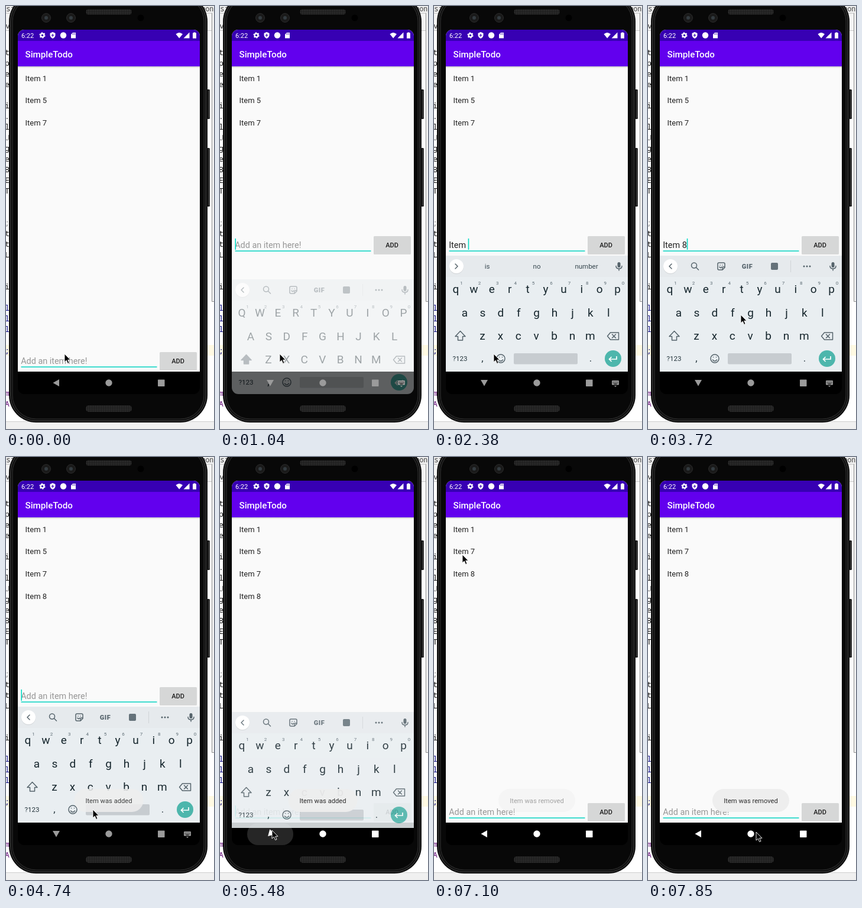
These frames come from a looping animation (352 px wide and 715 px high, 7.99 s). An HTML page:

```html
<!DOCTYPE html>
<html lang="en">
<head>
<meta charset="utf-8">
<title>Todo list demo</title>
<style>
  html, body { margin: 0; width: 100%; height: 100%; overflow: hidden; background: #fff; }
  svg { display: block; width: 352px; height: 715px; }
  text { font-family: Roboto, sans-serif; white-space: pre; }
  .code text { font: 13px "Noto Sans Mono", "DejaVu Sans Mono", monospace; }
  .mid { text-anchor: middle; }
  .line { fill: none; stroke: #55636b; stroke-width: 1.5; stroke-linecap: round; stroke-linejoin: round; }
</style>
</head>
<body>
<svg viewBox="0 0 352 715">
  <defs>
    <clipPath id="screen"><rect x="20" y="40" width="308" height="616" rx="11"/></clipPath>
    <pattern id="mesh" width="3" height="3" patternUnits="userSpaceOnUse">
      <rect width="3" height="3" fill="#191919"/><circle cx="1.5" cy="1.5" r=".9" fill="#3d3d3d"/>
    </pattern>
    <linearGradient id="shade" x2="0" y2="1">
      <stop stop-color="#000" stop-opacity=".2"/><stop offset="1" stop-color="#000" stop-opacity="0"/>
    </linearGradient>
  </defs>

  <!-- editor behind the phone -->
  <rect width="352" height="12" fill="#ececec"/>
  <rect y="12" width="352" height="30" fill="#f4f4f4"/>
  <path d="M0 12.5H352M0 41.5H352" stroke="#c9c9c9"/>
  <rect y="573" width="352" height="18" fill="#fffae3"/>
  <rect x="348" y="12" width="4" height="488" fill="#f1f1f1"/>
  <path d="M348.5 12V499.5H352" fill="none" stroke="#8e8e8e"/>
  <rect y="702" width="352" height="13" fill="#f0f0f0"/>
  <path d="M0 702.5H352" stroke="#cfcfcf"/>
  <g id="code" class="code"></g>
  <text x="331" y="9" font-size="12" fill="#444">hon</text>

  <!-- phone body -->
  <rect x="339" y="141" width="6" height="50" rx="1.5" fill="#1b1b1b"/>
  <rect x="339" y="240" width="6" height="99" rx="1.5" fill="#1b1b1b"/>
  <path d="M343.5 143V189M343.5 242V337" stroke="#4a4a4a"/>
  <rect x="5" y="-20" width="336" height="724" rx="46" fill="#0a0a0a"/>
  <rect x="7.5" y="-17.5" width="331" height="719" rx="43.5" fill="#111" stroke="#424242"/>
  <rect x="11" y="-14" width="324" height="712" rx="40" fill="#080808" stroke="#303030"/>
  <rect x="135.500" y="5.500" width="77" height="9" rx="4" fill="url(#mesh)"/>
  <rect x="135" y="675" width="78" height="11" rx="5" fill="url(#mesh)"/>
  <g fill="#1a1a1a" stroke="#2b2b2b">
    <circle cx="68" cy="20" r="7.500"/><circle cx="110" cy="20" r="7.500"/>
  </g>
  <circle cx="68" cy="20" r="3" fill="#333b40"/><circle cx="110" cy="20" r="3" fill="#333b40"/>
  <circle cx="228" cy="20" r="5.500" fill="#000"/>

  <g clip-path="url(#screen)">
    <rect x="20" y="40" width="308" height="578" fill="#fafafa"/>
    <rect x="20" y="102" width="308" height="3" fill="url(#shade)"/>
    <rect x="20" y="59" width="308" height="43" fill="#6200ee"/>
    <rect x="20" y="40" width="308" height="19" fill="#3700b3"/>
    <text x="32.500" y="87" font-size="15.200" font-weight="500" fill="#fff">SimpleTodo</text>

    <!-- status bar -->
    <g fill="#fff">
      <text x="26" y="53.500" font-size="11">6:22</text>
      <circle cx="61.500" cy="49.500" r="2.900" fill="none" stroke="#fff" stroke-width="2.200"/>
      <circle cx="61.500" cy="49.500" r="4.500" fill="none" stroke="#fff" stroke-width="1.300" stroke-dasharray="2.350"/>
      <path d="M79 44L83.500 46V49.500Q83 53 79 55Q75 53 74.500 49.500V46Z"/>
      <circle cx="97" cy="49.500" r="5.200"/>
      <path d="M113 45H118V54.500H110V48Z"/>
      <path d="M287.500 47.500Q293 42.500 299 47.500L293.200 54.500Z"/>
      <path d="M310.500 44.500V54.500H300.500Z"/>
      <path d="M317.500 44.500H320.500V45.500H322V54.800H316V45.500H317.500Z"/>
    </g>
    <path d="M79 47V52M76.800 49.500H81.200" stroke="#3700b3" stroke-width="1.200"/>
    <path d="M112.500 46.500V48.500M114.500 46V48.500M116.500 46V48.500" stroke="#3700b3" stroke-width=".8"/>

    <g id="list" font-size="13" fill="#212121"></g>

    <g id="field">
      <text id="entry" x="25.200" y="605" font-size="14.400"></text>
      <rect id="caret" y="589" width="1.600" height="19" fill="#03dac5"/>
      <rect x="25.500" y="609.300" width="230" height="1.700" fill="#1fd8c8"/>
      <rect x="260" y="586.500" width="63" height="29.500" rx="1.500" fill="#000" opacity=".13"/>
      <rect id="add" x="260" y="585" width="63" height="30" rx="1.500"/>
      <text class="mid" x="291" y="604" font-size="11" font-weight="500" fill="#1c1c1c">ADD</text>
    </g>

    <rect x="20" y="618" width="308" height="38" fill="#000"/>
    <rect id="ripple" x="46" y="619" width="78" height="37" rx="18" fill="#262626"/>

    <g id="keyboard">
      <rect x="20" y="422" width="308" height="196" fill="#e9eef1"/>
      <rect x="20" y="422" width="308" height="36" fill="#e6eaed"/>
      <circle cx="38" cy="441" r="12" fill="#000" opacity=".1"/>
      <circle cx="38" cy="440" r="12" fill="#fff"/>
      <path id="chevron" class="line" d="M40 436L36 440L40 444"/>
      <g id="tools">
        <circle class="line" cx="78" cy="438.500" r="4.500"/>
        <path class="line" d="M81.500 442L85.500 446" stroke-width="2"/>
        <path class="line" d="M120 434H128Q130 434 130 436V442L126 446H120Q118 446 118 444V436Q118 434 120 434M130 441H127Q126 441 126 446M121 441Q123 444 125 441M122 438H122.100M126 438H126.100"/>
        <text class="mid" x="168" y="444" font-size="11" font-weight="900" letter-spacing=".5" fill="#55636b">GIF</text>
        <rect x="208" y="434" width="12" height="12" rx="2" fill="#65727a"/>
        <path d="M241.500 430V450" stroke="#d0d5d8"/>
        <g fill="#55636b"><circle cx="264" cy="440" r="1.500"/><circle cx="269" cy="440" r="1.500"/><circle cx="274" cy="440" r="1.500"/></g>
      </g>
      <g id="hints" class="mid" font-size="11.500" fill="#37474f"></g>
      <rect x="310.500" y="433" width="5" height="9" rx="2.500" fill="#55636b"/>
      <path class="line" d="M308 439.500Q308 444 313 444Q318 444 318 439.500M313 444V447"/>
      <g id="keys" class="mid" fill="#15252c"></g>
      <path id="shift" class="line" d="M44.500 549.500L53 558.500H48.500V565H40.500V558.500H36Z"/>
      <path class="line" d="M298.500 552H312.500V564H298.500L293.500 558ZM301.500 555L307.500 561M307.500 555L301.500 561"/>
      <g class="mid" fill="#26363d">
        <text x="44" y="600" font-size="11.500">?123</text>
        <text x="82" y="601" font-size="17">,</text>
        <text x="265" y="601" font-size="17">.</text>
      </g>
      <circle class="line" cx="113" cy="596" r="7"/>
      <path class="line" d="M109.500 598Q113 602.500 116.500 598M110.500 593.500H110.600M115.500 593.500H115.600"/>
      <rect x="135" y="587" width="108" height="18.500" rx="2" fill="#c7ccd0"/>
      <circle cx="303" cy="596" r="14" fill="#4db6ac"/>
      <path d="M309 592V597H297M300.500 593L296.500 597L300.500 601" fill="none" stroke="#fff" stroke-width="1.700"/>
    </g>

    <g id="nav">
      <path id="back" d="M-5.500 0L5 -6V6Z"/>
      <circle cx="174" cy="637" r="5.700"/>
      <rect x="257" y="631.500" width="11.500" height="11.500" rx=".8"/>
      <g id="ime">
        <rect x="301" y="633" width="12" height="7.500" rx="1"/>
        <path d="M302.500 635.500H311.500M302.500 637.500H311.500" stroke="#000" stroke-dasharray="1 1"/>
        <path d="M304.500 639H309.500" stroke="#000"/><path d="M305 642H309L307 644Z"/>
      </g>
    </g>

    <g id="toast">
      <rect id="pill" y="561" height="39" rx="19.500" fill="#eeeeee"/>
      <text id="message" class="mid" x="174" y="585" font-size="11.200" fill="#202020"></text>
    </g>
  </g>

  <path id="mouse" d="M0 0V14L3.300 11L5.600 16.400L8 15.400L5.700 10.200H10Z" fill="#000" stroke="#fff" stroke-width=".9"/>
</svg>
<script>
const LOOP = 7990;
const LIFT = -196;
const $ = id => document.getElementById(id);
const set = (el, attrs) => { for (const k in attrs) el.setAttribute(k, attrs[k]); };
const show = (id, on) => { $(id).style.display = on ? '' : 'none'; };

function addText(parent, x, y, value, attrs = {}) {
  const el = document.createElementNS('http://www.w3.org/2000/svg', 'text');
  set(el, { x, y, ...attrs });
  el.textContent = value;
  parent.append(el);
  return el;
}

// Visible line endings of the code, one character per 18px line.
[...'tpee i.lUgeBET  ;ttL  i lll ;   mA'].forEach((ch, i) => {
  const bold = i > 22 && i < 29;
  const fill = i > 31 ? '#660e7a' : bold ? '#000080' : ch === 'U' || i === 16 ? '#808080' : '#111';
  addText($('code'), -2, 82.5 + 18 * i, ch, { fill, 'font-weight': bold ? 700 : 400 });
});
addText($('code'), 0, 9, 'si', { fill: '#444' });
addText($('code'), -1, 38, 'v', { fill: '#333' });

const letters = [];
[['qwertyuiop', 37, 485], ['asdfghjkl', 52, 524.5], ['zxcvbnm', 82, 564]].forEach(([row, x0, y], r) =>
  [...row].forEach((ch, i) => {
    const x = x0 + 30.4 * i;
    letters.push([ch, addText($('keys'), x, y, ch, { 'font-size': 19 })]);
    if (r === 0) addText($('keys'), x + 9.5, 471, (i + 1) % 10, { 'font-size': 8, fill: '#5d6b73' });
  }));

const rows = [0, 1, 2, 3].map(i => addText($('list'), 32.5, 126.5 + 37.7 * i, ''));
const hintTexts = [90, 174, 258].map(x => addText($('hints'), x, 444, ''));

// Each track: [start in ms, values...], held until the next step.
const tracks = {
  mouse: [[0, 99, 588], [890, 101, 588], [3580, 128, 560], [3720, 157, 522], [3860, 214, 462],
    [4010, 266, 414], [4160, 284, 398], [4600, 225, 490], [4740, 147, 596], [4890, 112, 624],
    [5040, 88, 631], [5770, 82, 560], [5920, 62, 330], [6060, 50, 190], [6210, 48, 165],
    [7250, 60, 200], [7400, 100, 340], [7550, 160, 520], [7700, 197, 619], [7850, 183, 634]],
  keyboard: [[0, 0, 0], [1040, 40, .4], [1190, 9, .9], [1340, 0, 1], [5480, 9, .87], [5620, 26, .4], [5770, 0, 0]],
  lifted: [[0, false], [1040, true], [5480, false]],
  entry: [[0, ''], [1930, 'I'], [2230, 'Ite'], [2380, 'Item '], [3430, 'Item 8'], [4450, '']],
  caps: [[0, true], [1930, false]],
  hints: [[0, ''], [2230, 'Ite|Item|Items'], [2380, 'is|no|number'], [3430, '']],
  caret: [[0, 0], [440, 1], [1340, 0], [1780, 1], [2830, 0], [3430, 1], [4010, 0], [4450, 1], [5040, 0],
    [5480, 1], [6060, 0], [6500, 1], [6950, 0], [7400, 1], [7850, 0]],
  items: [[0, '157'], [4450, '1578'], [7100, '178']],
  toast: [[0, '', 0], [4600, 'added', .4], [4740, 'added', .85], [4890, 'added', .94], [6500, 'added', .4],
    [6650, '', 0], [7100, 'removed', .4], [7250, 'removed', .85], [7400, 'removed', .94]],
  back: [[0, 0], [1040, -90], [5480, -45], [5620, 0]],
  navColor: [[0, '#9b9b9b'], [5330, '#fff']],
  ripple: [[0, 0], [5330, .6], [5480, 1], [5620, .4], [5770, 0]],
  pressed: [[0, false], [4450, true], [4600, false]]
};

function at(name, t) {
  const [, ...values] = tracks[name].findLast(step => step[0] <= t);
  return values;
}

function render(t) {
  const get = name => at(name, t)[0];
  const [mx, my] = at('mouse', t);
  set($('mouse'), { transform: `translate(${mx} ${my})` });

  const items = get('items');
  rows.forEach((row, i) => { row.textContent = items[i] ? `Item ${items[i]}` : ''; });

  const lifted = get('lifted'), entry = get('entry');
  set($('field'), { transform: `translate(0 ${lifted ? LIFT : 0})` });
  $('entry').textContent = entry || 'Add an item here!';
  set($('entry'), { fill: entry ? '#212121' : '#969696' });
  set($('caret'), { x: entry ? 25.2 + $('entry').getComputedTextLength() : 25.4, opacity: get('caret') });
  set($('add'), { fill: get('pressed') ? '#c3c4c4' : '#d6d7d7' });

  const [dy, alpha] = at('keyboard', t);
  set($('keyboard'), { transform: `translate(0 ${dy})`, opacity: alpha });
  const caps = get('caps');
  letters.forEach(([ch, el]) => { el.textContent = caps ? ch.toUpperCase() : ch; });
  $('shift').style.fill = caps ? '#55636b' : 'none';
  const hints = get('hints');
  hintTexts.forEach((el, i) => { el.textContent = hints.split('|')[i] || ''; });
  show('tools', !hints);
  set($('chevron'), { transform: hints ? 'rotate(180 38 440)' : '' });

  set($('nav'), { fill: get('navColor') });
  set($('back'), { transform: `translate(85 637) rotate(${get('back')})` });
  set($('ripple'), { opacity: get('ripple') });
  show('ime', lifted);

  const [word, opacity] = at('toast', t);
  const width = word === 'removed' ? 130 : 117;
  set($('toast'), { opacity });
  set($('pill'), { x: 174 - width / 2, width });
  $('message').textContent = `Item was ${word}`;
}

const start = performance.now();
function tick() {
  render((performance.now() - start) % LOOP);
  requestAnimationFrame(tick);
}
tick();
</script>
</body>
</html>
```
